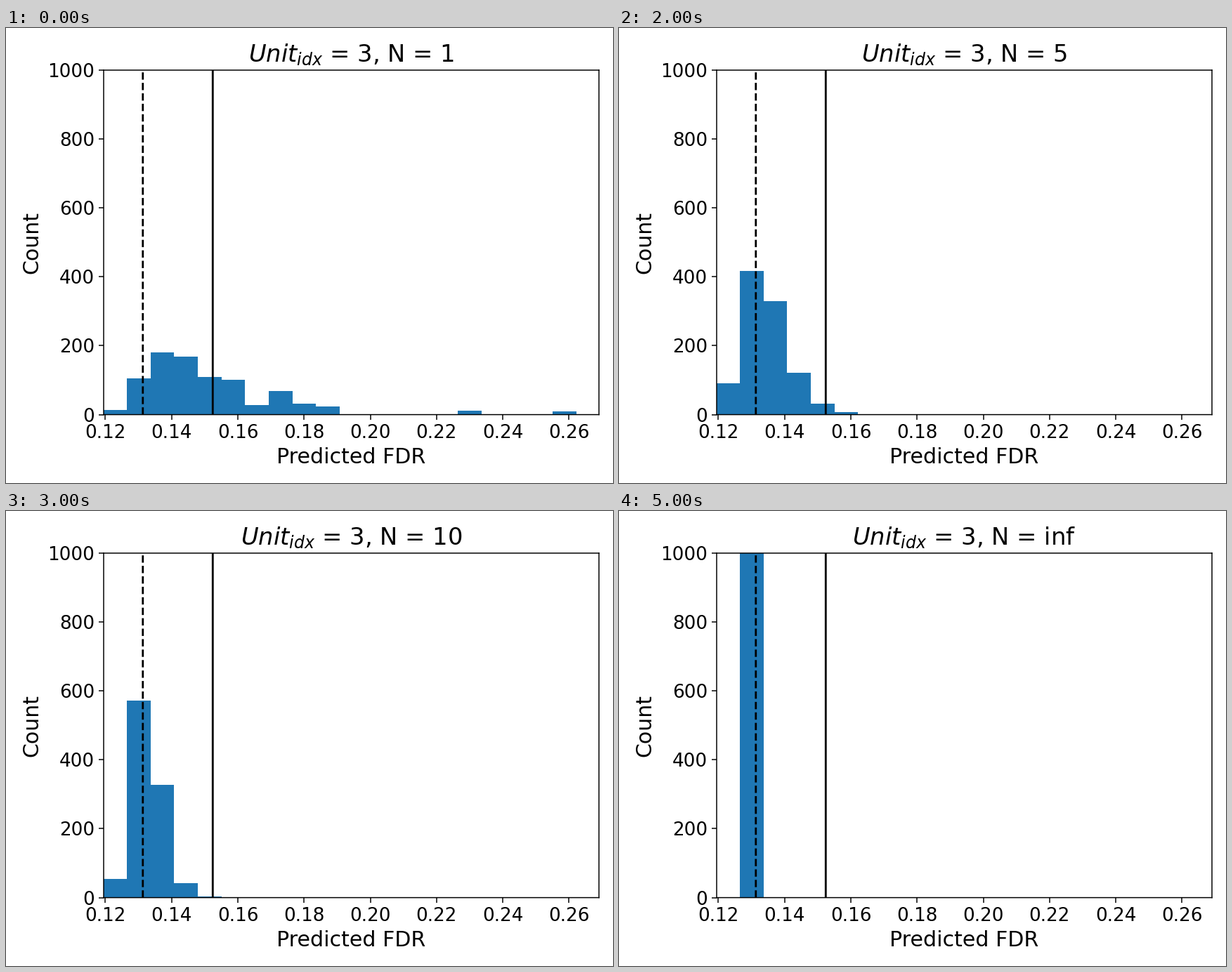
Animation, 864 px wide and 648 px high, one loop 6000 ms. Source, as a matplotlib script:

```python
import math

import numpy as np
import matplotlib.pyplot as plt
from matplotlib.animation import FuncAnimation

W, H, DPI = 864, 648, 135
LEFT, RIGHT, TOP, BOTTOM = 139, 844, 60, 550.6

SAMPLE_SIZES = [1, 2, 5, 10, 20, math.inf]
TRIALS, BINS = 1000, 21
START, BIN_WIDTH = 0.11934, 0.15 / BINS
LIMIT, MEAN = 0.1313, 0.15241

# Single draws only repeat the few values of the raw sample
RAW = [13, 105, 180, 168, 109, 102, 27, 68, 31, 24]
OUTLIERS = {15: 11, 19: 9}


def normal_cdf(z):
    return 0.5 * (1 + math.erf(z / math.sqrt(2)))


def histogram(n):
    """Counts per bin: a lognormal that narrows onto LIMIT as n grows."""
    if n == 1:
        counts = np.zeros(BINS)
        counts[:len(RAW)] = RAW
        for k, count in OUTLIERS.items():
            counts[k] = count
        return counts
    center = math.log((LIMIT - START) / BIN_WIDTH + 1) + 0.752 * n ** -1.2
    slope = 1.5 * math.sqrt(n)
    cdf = [normal_cdf(slope * (math.log(k + 1) - center))
           for k in range(BINS + 1)]
    return np.round(TRIALS * np.diff(cdf))


plt.rcParams["font.family"] = "DejaVu Sans"
fig = plt.figure(figsize=(W / DPI, H / DPI), dpi=DPI, facecolor="white")
ax = fig.add_axes([LEFT / W, 1 - BOTTOM / H,
                   (RIGHT - LEFT) / W, (BOTTOM - TOP) / H])

bars = ax.bar(START + BIN_WIDTH * np.arange(BINS), np.zeros(BINS),
              width=BIN_WIDTH, align="edge", color="tab:blue", linewidth=0)
for x, style in ((LIMIT, "--"), (MEAN, "-")):
    ax.axvline(x, color="black", linestyle=style, linewidth=1.5, snap=False)
for spine in ax.spines.values():
    spine.set_snap(False)

ax.set_xlim(0.11947, 0.26902)
ax.set_ylim(0, TRIALS)
ax.set_xticks(np.arange(12, 27, 2) / 100)
ax.set_yticks(range(0, TRIALS + 1, 200))
ax.tick_params(labelsize=14)
ax.set_xlabel("Predicted FDR", fontsize=16)
ax.set_ylabel("Count", fontsize=16)
title = ax.set_title("", fontsize=18)


def update(i):
    n = SAMPLE_SIZES[i]
    for bar, count in zip(bars, histogram(n)):
        bar.set_height(count)
        bar.set_visible(count > 0)
    title.set_text(rf"$Unit_{{idx}}$ = 3, N = {n}")
    return [*bars, title]


anim = FuncAnimation(fig, update, frames=len(SAMPLE_SIZES), interval=1000,
                     init_func=lambda: update(0), repeat=True,
                     repeat_delay=0, blit=False)
plt.show()
```
